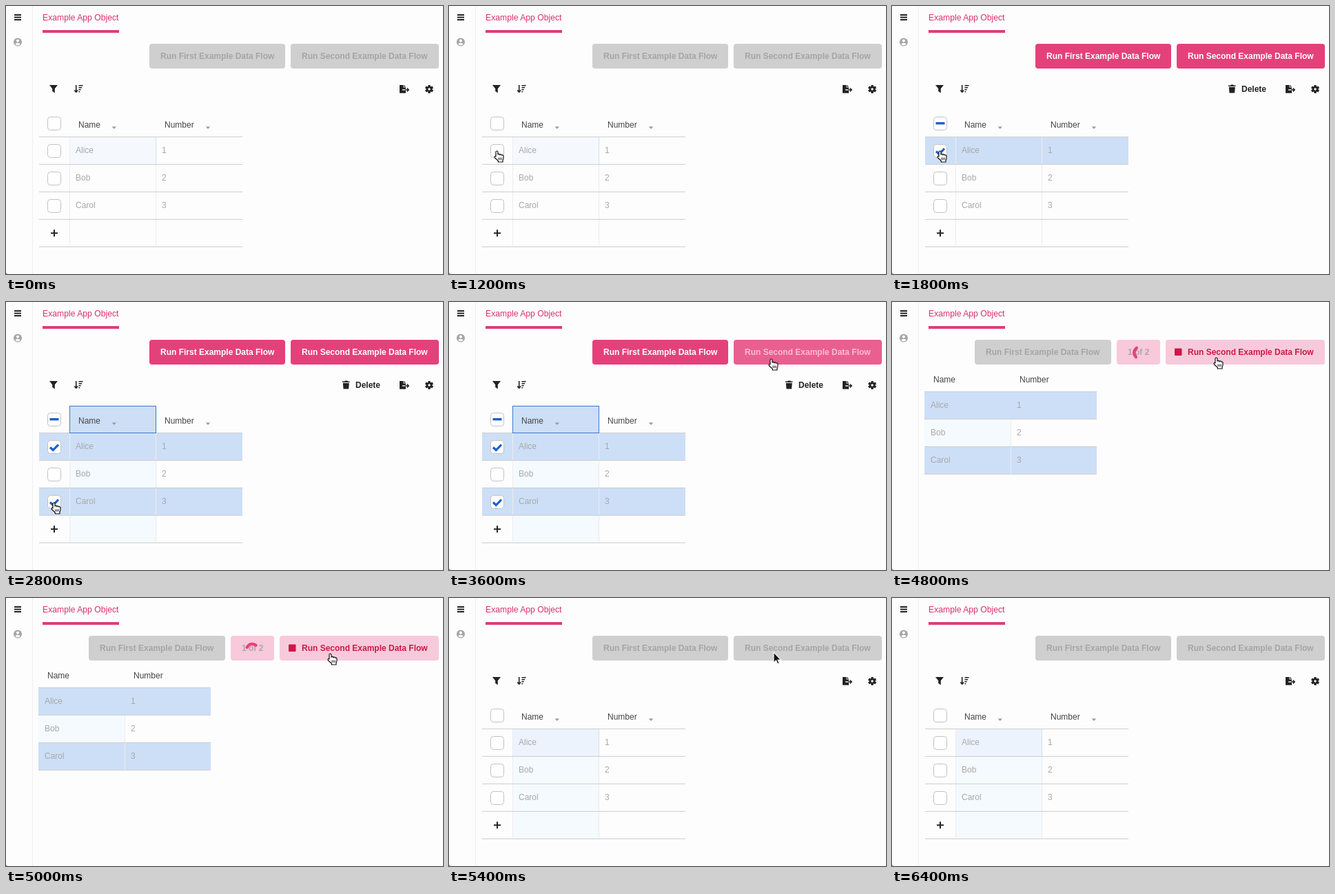
Recreate the animation shown at these times as an HTML page. Size 634 by 390 pixels, loop 6.6 s.

```html
<!DOCTYPE html>
<html lang="en">
<head>
<meta charset="utf-8">
<style>
  html, body { margin: 0; width: 100%; height: 100%; overflow: hidden; background: #fdfdfd; }
  svg { display: block; font: 12px "Liberation Sans", Arial, sans-serif; }
  .bold { font-weight: bold; }
</style>
</head>
<body>
<svg width="634" height="390" viewBox="0 0 634 390">
  <rect width="634" height="390" fill="#fdfdfd"/>
  <path d="M38.5 0V390" stroke="#f0f0f0"/>
  <path d="M0 387.5Q0 390 2.5 390H0Z" fill="#333"/>
  <path d="M12 13H22M12 16.5H22M12 20H22" stroke="#222" stroke-width="1.8"/>
  <circle cx="17" cy="52.5" r="6" fill="#a6a6a6"/>
  <circle cx="17" cy="50.6" r="2.1" fill="#fdfdfd"/>
  <path d="M13.3 55.8Q14 53.8 17 53.8T20.7 55.8Q19.3 57.2 17 57.2T13.3 55.8Z" fill="#fdfdfd"/>
  <text x="53" y="21" font-size="12.2" fill="#d5326d">Example App Object</text>
  <rect x="53" y="35" width="111" height="4" fill="#dc3e77"/>
  <g id="view"></g>
</svg>
<script>
const LOOP = 6600, STEP = 200;
const PINK = '#e4417a', SELECTED = '#cddff6', TINT = '#f5fafe', BLUE = '#1d5fcf';
const PEOPLE = ['Alice', 'Bob', 'Carol'];
const view = document.getElementById('view');

const rect = (x, y, w, h, fill, extra = '') =>
  `<rect x="${x}" y="${y}" width="${w}" height="${h}" fill="${fill}" ${extra}/>`;
const line = (d, color, width = 1, extra = '') =>
  `<path d="${d}" fill="none" stroke="${color}" stroke-width="${width}" ${extra}/>`;
const shape = (d, fill) => `<path d="${d}" fill="${fill}"/>`;
const text = (x, y, label, fill, cls = '') =>
  `<text x="${x}" y="${y}" fill="${fill}" class="${cls}">${label}</text>`;
const button = (x, w, label, fill, color, textX = x + 16) =>
  rect(x, 55, w, 36, fill, 'rx="4"') + text(textX, 77, label, color, 'bold');

const checkbox = y => rect(60.5, y + .5, 19, 19, '#fff', 'rx="4" stroke="#c2c2c2"');
const tick = y => line(`M64 ${y + 10.5}L68.3 ${y + 14.8 - .3}L76 ${y + 6.7}`, BLUE, 3.2);
const caret = x => shape(`M${x} 175.5h6.4l-3.2 3.4Z`, '#999');

function toolbar(hasSelection) {
  const dark = '#222';
  const teeth = Array.from({ length: 6 }, (_, i) =>
    rect(612.4, 115, 3.2, 4, dark, `transform="rotate(${i * 60} 614 121)"`)).join('');
  return shape('M63 115H75L70.8 120.3V126.5L67.2 124V120.3Z', dark) +
    line('M101.7 115V125M99.2 122.5L101.7 125.3L104.2 122.5', dark, 1.6) +
    line('M105.5 115.8H111.5M105.5 118.8H110M105.5 121.8H108.6M105.5 124.8H107.3', dark, 1.5) +
    shape('M571 115H576.5V118.5H580V126.8H571ZM577.3 114.8L580 117.6H577.3Z', dark) +
    line('M575 122H579.5', '#fdfdfd', 1.4) +
    line('M580 122H584M581.7 119.5L584.2 122L581.7 124.5', dark, 1.5) +
    teeth + `<circle cx="614" cy="121" r="3.1" fill="none" stroke="${dark}" stroke-width="2.6"/>` +
    (hasSelection
      ? shape('M488 115.5H491L492 114.5H495L496 115.5H498.5V117H488ZM488.8 118H497.8L497.1 126.6H489.5Z', dark) +
        text(507, 125, 'Delete', dark, 'bold')
      : '');
}

function editor(t) {
  const aliceOn = t >= 1400 && t < 5200, carolOn = t >= 2400 && t < 5200;
  const tinted = t >= 2400, hover = t >= 3400 && t < 5200;
  const on = [aliceOn, false, carolOn];
  let out = aliceOn
    ? button(208, 197, 'Run First Example Data Flow', PINK, '#fff') +
      button(413, 215, 'Run Second Example Data Flow', hover ? '#e95f90' : PINK, hover ? '#f7bfd3' : '#fff')
    : button(208, 197, 'Run First Example Data Flow', '#cfcfcf', '#a5a5a5') +
      button(413, 215, 'Run Second Example Data Flow', '#cfcfcf', '#a5a5a5');
  out += toolbar(aliceOn);
  if (tinted) out += rect(93, 191, 124, 160, TINT);
  if (!aliceOn) out += rect(93, 191, 125, 39, tinted ? '#edf3fd' : '#f5f9fe');
  on.forEach((selected, i) => {
    if (selected) out += rect(48, 191 + i * 40, 295, 40, SELECTED);
  });
  out += line('M92.5 191V350M217.5 191V350', '#ececec');
  if (!aliceOn) out += line('M217.5 191V230', '#cfe0f5');
  for (let i = 0; i < 5; i++) out += line(`M48 ${190.5 + i * 40}H343`, '#cecece');
  if (carolOn) out += rect(92.5, 151.5, 125, 39, SELECTED, 'stroke="#3b78cf"');
  out += text(105, 177, 'Name', '#444') + caret(153.6) +
    text(230, 177, 'Number', '#444') + caret(289.8) + checkbox(161);
  if (aliceOn) out += rect(63.5, 169, 13, 3.4, BLUE);
  PEOPLE.forEach((name, i) => {
    const y = 201 + i * 40;
    out += checkbox(y) + (on[i] ? tick(y) : '') +
      text(101, y + 13, name, '#a8a8a8') + text(226, y + 13, i + 1, '#a8a8a8');
  });
  return out + line('M65 330.5H75M70 325.5V335.5', '#222', 2);
}

function running(t) {
  let out = button(120, 198, 'Run First Example Data Flow', '#cfcfcf', '#a5a5a5') +
    button(326, 63, `${t < 4400 ? 0 : 1} of 2`, '#f7c9da', '#b5a2ab') +
    line('M355 66.8Q347.8 73 354 80.2', PINK, 4.2,
      `stroke-linecap="round" transform="rotate(${(t - 4800) * .36} 357.5 73)"`) +
    button(397, 231, 'Run Second Example Data Flow', '#f7cadb', '#cf1747', 429) +
    rect(410, 67.5, 10.5, 10.5, '#cf1747', 'rx="1"') +
    text(60, 117, 'Name', '#444') + text(185, 117, 'Number', '#444');
  PEOPLE.forEach((name, i) => {
    const y = 131 + i * 40;
    out += i === 1 ? rect(47, y, 125, 39, TINT) : rect(47, y, 250, 39, SELECTED);
    out += text(56, y + 23, name, '#a8a8a8') + text(181, y + 23, i + 1, '#a8a8a8');
  });
  out += line('M172.5 171V250', '#ececec');
  for (let i = 0; i < 4; i++) out += line(`M47 ${130.5 + i * 40}H297`, '#cecece');
  return out;
}

// Pointer stops: time, x, y
const STOPS = [
  [200, 437, 339], [1200, 70, 211], [1800, 70, 211], [2400, 70, 292], [2800, 70, 292],
  [3400, 468, 83], [3800, 468, 83], [4200, 471, 81], [5000, 471, 81], [5200, 471, 79],
  [5600, 471, 79], [6000, 478, 139], [6200, 437, 339]
];

function pointer(t) {
  if (t < 200 || t > 6200) return '';
  const i = Math.max(1, STOPS.findIndex(s => s[0] >= t));
  const [t0, x0, y0] = STOPS[i - 1], [t1, x1, y1] = STOPS[i];
  const p = (t - t0) / (t1 - t0), k = p * p * (3 - 2 * p);
  const hand = t >= 1200 && t <= 2800 || t >= 3400 && t < 5200;
  const icon = hand
    ? `<path d="M-2 1.3Q-2 0-.6 0T1 1.3V5.4Q1.3 4.4 2.4 4.4T3.9 5.5Q4.2 4.8 5.2 4.9T6.5 6Q7 5.6 7.8 5.8T9 7.2V10Q9 12 8 13.4V16H1.3V14.2L-3.6 9.8Q-4.5 8.3-3.6 7.6T-2 8.2Z" fill="#fff" stroke="#111" stroke-width="1.2"/>` +
      line('M2 9.5V13M4.1 9.5V13M6.2 9.5V13', '#111', .9)
    : '<path d="M0 0V15L3.5 11.8L5.8 17L8.2 16L6 11H10.7Z" fill="#111" stroke="#fff" stroke-width="1.1"/>';
  return `<g transform="translate(${x0 + (x1 - x0) * k} ${y0 + (y1 - y0) * k})">${icon}</g>`;
}

let shown = -1;
function frame(now) {
  const t = Math.floor(now % LOOP / STEP) * STEP;
  if (t !== shown) {
    shown = t;
    view.innerHTML = (t >= 4000 && t < 5200 ? running(t) : editor(t)) + pointer(t);
  }
  requestAnimationFrame(frame);
}
frame(performance.now());
</script>
</body>
</html>
```
